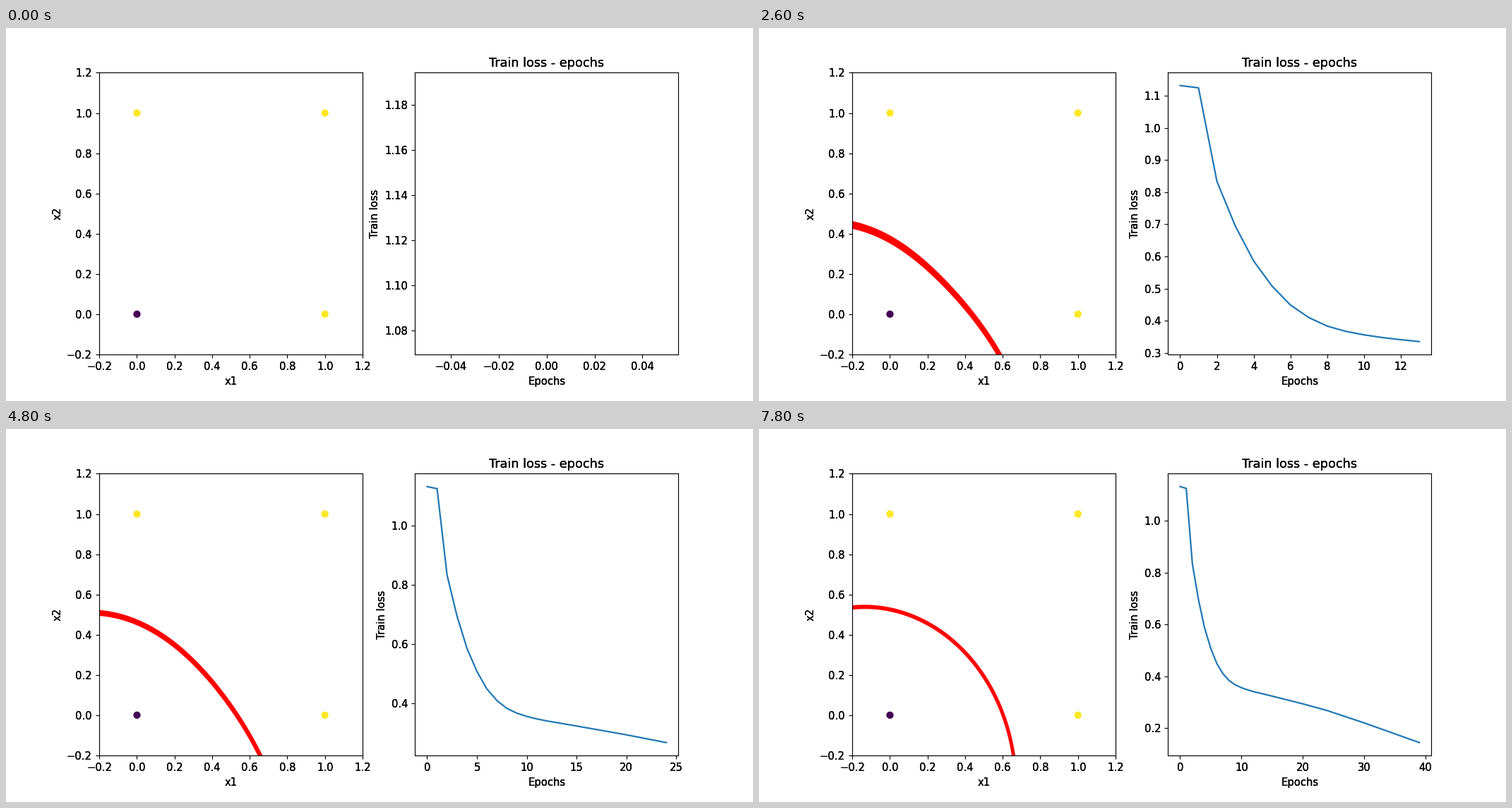
A matplotlib script that plays this animation: 1058 px wide and 529 px high, repeating every 8 s.

```python
import numpy as np
import matplotlib.pyplot as plt
from matplotlib.animation import FuncAnimation
from matplotlib.text import Text

EPOCHS = 40
FIRST_BOUNDARY = 5

# Training loss: early epochs listed, the slow tail from a few points.
EARLY = [1.1318, 1.1247, 0.8335, 0.6946, 0.5855, 0.5075,
         0.4485, 0.4095, 0.3831, 0.3669, 0.3559]
TAIL_X = [10, 11, 12, 15, 17, 20, 24, 30, 39]
TAIL_Y = [0.3559, 0.3475, 0.3408, 0.3235, 0.3116, 0.2937, 0.2676, 0.2203, 0.1443]
epochs = np.arange(EPOCHS)
loss = np.interp(epochs, TAIL_X, TAIL_Y)
loss[:len(EARLY)] = EARLY

# Decision boundary as polar curve around the lower left corner:
# epoch, radius at 0/30/60/90 degrees, band width in px at 0/90 degrees.
BOUNDARY = np.array([
    [39, 0.857, 0.801, 0.767, 0.735, 5.0, 6.0],
    [30, 0.858, 0.748, 0.7195, 0.725, 5.6, 7.0],
    [24, 0.855, 0.705, 0.681, 0.708, 6.2, 8.3],
    [17, 0.832, 0.662, 0.635, 0.682, 7.3, 10.0],
    [9, 0.647, 0.502, 0.482, 0.542, 7.5, 13.0],
    [5, 0.090, 0.070, 0.070, 0.090, 15.0, 26.0],
])
KNOT_ANGLES = [0, 30, 60, 90]
ANGLES = np.linspace(-8, 98, 160)
LOW, HIGH = -0.2, 1.2


def heavy_draw(self, renderer, draw=Text.draw):
    """Overdraw text so that its soft edges turn dark."""
    for _ in range(3):
        draw(self, renderer)


Text.draw = heavy_draw

fig, (ax, ax_loss) = plt.subplots(1, 2, figsize=(10, 5), dpi=105.8, facecolor="white")
fig.subplots_adjust(left=0.125, right=0.9, bottom=0.125, top=0.88, wspace=0.2)

ax.set(xlim=(LOW, HIGH), ylim=(LOW, HIGH), xlabel="x1", ylabel="x2")
ax.scatter([0, 0, 1, 1], [0, 1, 0, 1], c=[0, 1, 1, 1], cmap="viridis")
band, = ax.fill([], [], color="red", linewidth=0, zorder=1.5)

ax_loss.set(title="Train loss - epochs", xlabel="Epochs", ylabel="Train loss")
line, = ax_loss.plot([], [], color="tab:blue")

box = ax.get_position()
PX_PER_UNIT = np.array([box.width * 1058, box.height * 529]) / (HIGH - LOW)


def boundary_band(epoch):
    """Outline of the red band, in data coordinates."""
    # The boundary settles roughly with the inverse square of the epoch.
    pace = BOUNDARY[:, 0] ** -2.0
    values = [np.interp(epoch ** -2.0, pace, col) for col in BOUNDARY.T[1:]]
    radius = np.polyval(np.polyfit(KNOT_ANGLES, values[:4], 3), ANGLES)
    width = np.interp(ANGLES, [0, 90], values[4:])
    theta = np.radians(ANGLES)
    path = (radius * np.array([np.cos(theta), np.sin(theta)])).T * PX_PER_UNIT
    tangent = np.gradient(path, axis=0)
    normal = np.column_stack([tangent[:, 1], -tangent[:, 0]])
    normal *= (width / 2 / np.hypot(*normal.T))[:, None]
    outline = np.vstack([path + normal, (path - normal)[::-1]])
    return LOW + outline / PX_PER_UNIT


def update(epoch):
    line.set_data(epochs[:epoch + 1], loss[:epoch + 1])
    ax_loss.relim()
    ax_loss.autoscale()
    band.set_visible(epoch >= FIRST_BOUNDARY)
    if epoch >= FIRST_BOUNDARY:
        band.set_xy(boundary_band(epoch))
    return line, band


def init():
    return update(0)


anim = FuncAnimation(fig, update, frames=EPOCHS, init_func=init, interval=200,
                     repeat=True, repeat_delay=0, blit=False)
plt.show()
```
